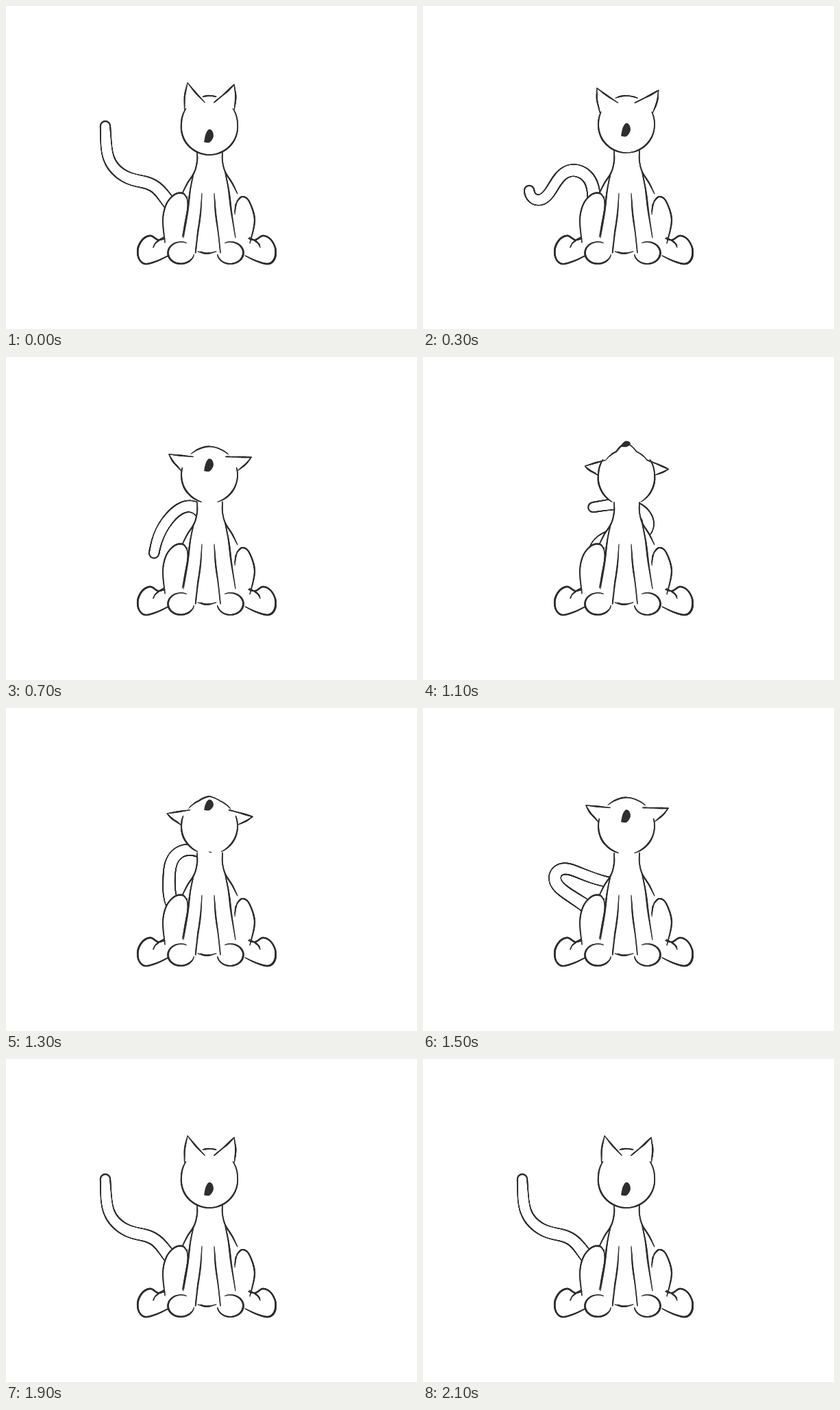
Recreate the animation shown at these times as an HTML page with a canvas. Size 600x471 px, loop 2200 ms.

```html
<!DOCTYPE html>
<html lang="en">
<head>
<meta charset="utf-8">
<title>Cat looking up</title>
<style>
html, body { margin: 0; width: 100%; height: 100%; overflow: hidden; background: #fff; }
canvas { display: block; width: 600px; height: 471px; }
</style>
</head>
<body>
<canvas id="stage" width="600" height="471"></canvas>
<script>
const ctx = document.getElementById("stage").getContext("2d");
const INK = "#2e2e30", PAPER = "#fff";
const LOOP = 2200, STEP = 100;
const RAD = Math.PI / 180;

const pts = s => s.trim().split(/\s+/).map(p => p.split(",").map(Number));
const mix = (a, b, k) => a + (b - a) * k;
const range = (n, f) => Array.from({ length: n + 1 }, (_, i) => f(i / n));
const flip = (points, axis) => points.map(([x, y]) => [2 * axis - x, y]);

function random(seed) {
  const v = Math.sin(seed * 127.1 + 11.7) * 43758.5453;
  return v - Math.floor(v);
}

// Catmull-Rom through four neighbouring values
const cubic = (a, b, c, d, u) => 0.5 * (2 * b + (c - a) * u +
  (2 * a - 5 * b + 4 * c - d) * u * u + (3 * b - a - 3 * c + d) * u * u * u);

// Value of a smooth curve through evenly spaced numbers, s from 0 to 1
function along(list, s) {
  const last = list.length - 1;
  const i = Math.min(last - 1, Math.floor(s * last));
  const at = n => list[Math.max(0, Math.min(last, n))];
  return cubic(at(i - 1), at(i), at(i + 1), at(i + 2), s * last - i);
}

function spline(points) {
  const xs = points.map(p => p[0]), ys = points.map(p => p[1]);
  return range(points.length * 12, s => [along(xs, s), along(ys, s)]);
}

function fill(points, color) {
  ctx.fillStyle = color;
  ctx.beginPath();
  points.forEach(p => ctx.lineTo(...p));
  ctx.fill();
}

function pen(curve, width, seed) {
  const n = curve.length - 1;
  ctx.strokeStyle = INK;
  ctx.lineCap = "round";
  for (let i = 0; i < n; i++) {
    const u = (i + 0.5) / n;
    ctx.lineWidth = width * (0.5 + 0.5 * Math.sin(Math.PI * u) ** 0.6) +
      0.25 * Math.sin(u * 9 + seed);
    ctx.beginPath();
    ctx.moveTo(...curve[i]);
    ctx.lineTo(...curve[i + 1]);
    ctx.stroke();
  }
}

// Sketched line: a full stroke and a short, slightly shifted retrace
function sketch(curve, width, seed) {
  pen(curve, width, seed);
  const n = curve.length, from = Math.floor(n * 0.55 * random(seed));
  const dx = mix(-1, 1, random(seed + 50)), dy = mix(-1, 1, random(seed + 90));
  const part = curve.slice(from, from + Math.ceil(n * 0.45));
  pen(part.map(([x, y]) => [x + dx, y + dy]), width * 0.6, seed + 3);
}

// Body: parts drawn on the left and mirrored at their own axis
const neck = spline(pts("279,211 279,226 275,242 265,258 257,274"));
const arm = spline(pts("274,243 269,268 265,300 259,338"));
const chest = spline(pts("286,273 284,302 280,332 277,360"));
const foot = spline(pts("232,339 222,341 211,335 200,340 193,353 194,368 203,376 220,372 237,364"));
const toe = spline(pts("215,352 219,345 231,337"));
const paw = range(40, s => {
  const a = mix(-65, -350, s) * RAD;
  return [255.5 + 19 * Math.cos(a), 360 + 16 * Math.sin(a)];
});
const haunchL = spline(pts("264,280 258,273 246,275 234,289 229,312 232,345"));
const haunchR = spline(pts("337,285 345,278 355,285 363,312 356,346"));

const mirrored = [[neck, 297.5, 2], [arm, 297, 2.3], [chest, 295, 2],
  [foot, 293, 2.5], [toe, 293, 1.7], [paw, 291.5, 2.5]];
const body = [
  ...mirrored.flatMap(([c, axis, w]) => [[c, w], [flip(c, axis), w]]),
  [haunchL, 2.2], [haunchR, 2.3],
  [spline(pts("264,278 265,296 258,336")), 1.8],
  [spline(pts("341,280 336,289 334,304")), 1.5],
  [spline(pts("280,358 293,361 307,358")), 1.8]
];
const bodyFill = [...neck, ...haunchL, ...haunchR.slice().reverse(),
  ...flip(neck, 297.5).reverse()];

// Tail poses: time, length, then headings in degrees from base to tip
const rest = [182, 135, 129, 168, 140, 99, 92];
const tails = [
  [0, ...rest],
  [300, 170, 97, 100, 158, 230, 222, 95],
  [700, 200, 44, 56, 106, 206, 240, 260],
  [1100, 211, 105, 30, 0, 120, 178, 190],
  [1300, 190, 125, 95, 75, 0, -50, -70],
  [1500, 178, 134, 147, 125, -6, -20, -8],
  [1700, 187, 142, 136, 164, 118, -12, -32],
  [1900, ...rest]
];

function drawTail(t) {
  const next = tails.findIndex(row => row[0] > t);
  const b = tails.at(next), a = next > 0 ? tails[next - 1] : b;
  const k = a === b ? 0 : (t - a[0]) / (b[0] - a[0]);
  const [length, ...headings] = a.slice(1).map((v, i) => mix(v, b[i + 1], k));

  const n = 180, spine = [];
  let x = 252, y = 302;
  for (let i = 0; i <= n; i++) {
    spine.push([x, y]);
    const h = along(headings, i / n) * RAD;
    x += Math.cos(h) * length / n;
    y -= Math.sin(h) * length / n;
  }
  const sweep = (color, grow) => {
    ctx.fillStyle = color;
    spine.forEach(([px, py], i) => {
      const u = i / n;
      ctx.beginPath();
      ctx.arc(px, py, 9.5 - 2.2 * u + grow(u), 0, 2 * Math.PI);
      ctx.fill();
    });
  };
  sweep(INK, () => 0.9);
  sweep(PAPER, u => -1.1 + 0.3 * Math.sin(u * 17));
}

// 0 looks ahead, 1 looks straight up
function tiltAt(t) {
  return t < 1100 ? (t / 1100) ** 1.5 : Math.max(0, (1800 - t) / 700) ** 0.8;
}

// Point around the head, angle in degrees from the top
const around = (side, angle, r) =>
  [297 + side * r * Math.sin(angle * RAD), 172 - r * Math.cos(angle * RAD)];

function earCurves(side, turn, tilt) {
  const inner = around(side, 12 + 42 * turn, 32 + 5 * turn);
  const outer = around(side, 60 + 30 * turn, 42);
  const tip = around(side, (side < 0 ? 28 : 32) + 50 * turn, 68 - 6 * tilt ** 2);
  const edge = (from, bulge) => spline([from,
    [297 + side * bulge + (from[0] + tip[0] - 594) / 2, (from[1] + tip[1]) / 2], tip]);
  return [edge(outer, 2), edge(inner, 1).reverse()];
}

const noseShape = pts("-1,.85 -.65,-.3 0,-1 .75,-.75 .95,.1 .15,.9 -1,.85");

function drawHead(tilt) {
  const turn = 1 - (1 - tilt) ** 1.7;
  const peak = tilt ** 4;
  const crown = range(40, s => {
    const a = mix(-1, 1, s) * (14 + 40 * turn);
    return around(1, a, 41 + peak * (6 - 10 * Math.min(1, Math.abs(a) / 23)));
  });
  const chin = 4 * (2 * tilt - 1) ** 4;
  const cheek = side => range(50, s => {
    const a = mix(57 + 18 * Math.sin(Math.PI * tilt), 190 - 38 * turn, s);
    return around(side, a, 41 + chin * Math.max(0, -Math.cos(a * RAD)));
  });
  const left = cheek(-1), right = cheek(1);
  const ears = [-1, 1].map(side => earCurves(side, turn, tilt));

  ears.forEach(e => fill(e.flat(), PAPER));
  fill([...crown, ...right, ...left.slice().reverse()], PAPER);
  ears.flat().forEach((c, i) => sketch(c, 2, 40 + i));
  sketch(crown, 1.8, 31);
  sketch(left, 2.3, 32);
  sketch(right, 2.2, 33);
  fill(spline(noseShape.map(([x, y]) =>
    [296 + 7 * x, 190 - 63 * tilt + (10 - 5.5 * peak) * y])), INK);
}

function draw(t) {
  fill([[0, 0], [600, 0], [600, 471], [0, 471]], PAPER);
  drawTail(t);
  fill(bodyFill, PAPER);
  body.forEach(([curve, width], i) => sketch(curve, width, i));
  drawHead(tiltAt(t));
}

const start = performance.now();
let shown = -1;
function tick() {
  const t = Math.floor(((performance.now() - start) % LOOP) / STEP) * STEP;
  if (t !== shown) draw(shown = t);
  requestAnimationFrame(tick);
}
tick();
</script>
</body>
</html>
```
